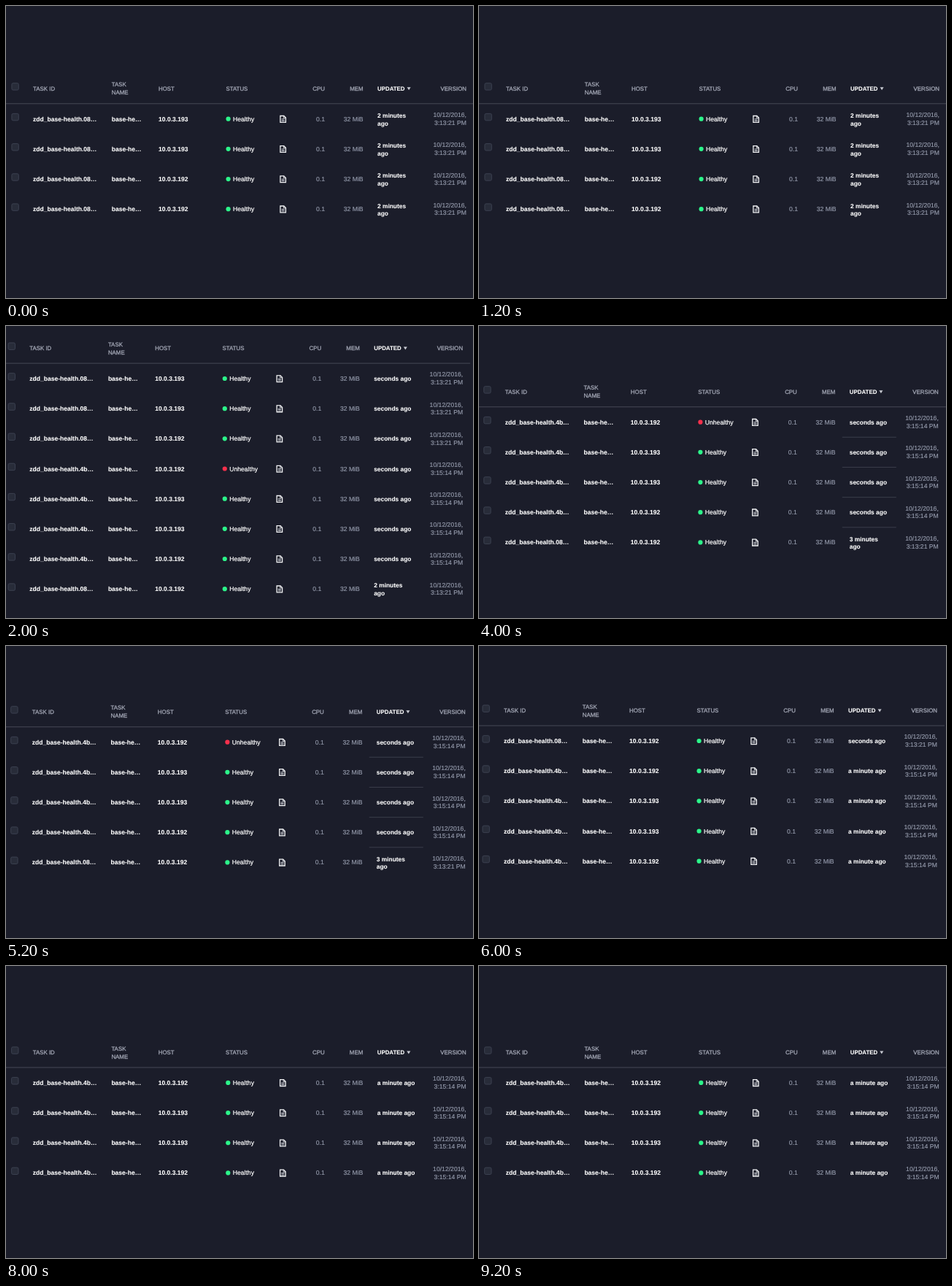
Write an HTML page that moves like this. It is 640 px wide and 400 px high and loops after 10 s.

```html
<!DOCTYPE html>
<html lang="en">
<head>
<meta charset="utf-8">
<title>Task table</title>
<style>
  html, body { margin: 0; width: 100%; height: 100%; overflow: hidden; background: #1b1d2a; }
  svg { display: block; width: 640px; height: 400px; }
  text {
    font: 8.65px "Liberation Sans", Arial, sans-serif;
    fill: #fff;
    stroke: #fff;
    stroke-width: .22px;
    text-rendering: geometricPrecision;
  }
  .head { font-size: 7.9px; fill: #a4a8b6; stroke: #a4a8b6; stroke-width: .28px; }
  .sorted { font-size: 7.9px; font-weight: bold; stroke-width: .1px; }
  .bold { font-weight: bold; font-size: 8.55px; stroke-width: .1px; }
  .updated { font-weight: bold; font-size: 8.4px; stroke-width: .1px; }
  .dim { fill: #949aab; stroke: #949aab; stroke-width: .16px; }
  .right { text-anchor: end; }
  .box { fill: #282c39; stroke: #3f4454; stroke-width: .9px; }
  .rule { stroke: #464956; stroke-width: 1px; }
  .thin { stroke: #3a3d4a; }
  .scene { visibility: hidden; animation: show 10s step-end infinite; }
  @keyframes show {
    0% { visibility: visible; }
    20%, 100% { visibility: hidden; }
  }
</style>
</head>
<body>
<svg id="stage" viewBox="0 0 640 400">
  <defs>
    <g id="doc">
      <path d="M.7 .7H5.6L8.2 3.3V9.5H.7Z" fill="none" stroke="#f2f3f5" stroke-width="1.3"/>
      <path d="M5.3 .7V3.6H8.2" fill="none" stroke="#f2f3f5" stroke-width=".8"/>
      <path d="M2.4 4.9H6.5M2.4 6.3H6.5M2.4 7.7H6.5" stroke="#d5d7dd" stroke-width=".8"/>
    </g>
  </defs>
</svg>
<script>
const stage = document.getElementById('stage');
const PITCH = 41.17;
const VERSIONS = { '08': '3:13:21 PM', '4b': '3:15:14 PM' };

// Each row: task suffix, last digit of host, time since update, optional red status.
const scenes = [
  { x: 0, y: 113, rows: [
    ['08', 3, '2 minutes'], ['08', 3, '2 minutes'],
    ['08', 2, '2 minutes'], ['08', 2, '2 minutes']] },
  { x: -4.8, y: 30.3, rows: [
    ['08', 3, 'seconds'], ['08', 3, 'seconds'], ['08', 2, 'seconds'],
    ['4b', 2, 'seconds', true], ['4b', 3, 'seconds'], ['4b', 3, 'seconds'],
    ['4b', 2, 'seconds'], ['08', 2, '2 minutes']] },
  { x: -1.2, y: 90, ruled: true, rows: [
    ['4b', 2, 'seconds', true], ['4b', 3, 'seconds'], ['4b', 3, 'seconds'],
    ['4b', 2, 'seconds'], ['08', 2, '3 minutes']] },
  { x: -3, y: 88.3, rows: [
    ['08', 2, 'seconds'], ['4b', 2, 'a minute'], ['4b', 3, 'a minute'],
    ['4b', 3, 'a minute'], ['4b', 2, 'a minute']] },
  { x: -.3, y: 118.2, rows: [
    ['4b', 2, 'a minute'], ['4b', 3, 'a minute'],
    ['4b', 3, 'a minute'], ['4b', 2, 'a minute']] }
];

const text = (x, y, cls, str) => `<text x="${x}" y="${y}" class="${cls}">${str}</text>`;
const rule = (x1, x2, y, cls = '') => `<path class="rule ${cls}" d="M${x1} ${y}H${x2}"/>`;
const checkbox = y => `<rect class="box" x="7.9" y="${y - 7.3}" width="9.4" height="9.4" rx="1.8"/>`;

function header() {
  return checkbox(0) +
    text(37, 2.8, 'head', 'TASK ID') +
    text(144.7, -2.7, 'head', 'TASK') +
    text(144.7, 8.4, 'head', 'NAME') +
    text(209, 2.8, 'head', 'HOST') +
    text(301.4, 2.8, 'head', 'STATUS') +
    text(437, 2.8, 'head right', 'CPU') +
    text(489.6, 2.8, 'head right', 'MEM') +
    text(509, 2.8, 'sorted', 'UPDATED') +
    '<path d="M549.6 -1.8H554.6L552.1 2.3Z" fill="#c9cbd3"/>' +
    text(631, 2.8, 'head right', 'VERSION') +
    rule(-10, 641, 20.8);
}

function row([id, host, since, failing], y) {
  const wraps = since.endsWith('minutes');
  const updated = wraps
    ? text(509, y - 1.7, 'updated', since) + text(509, y + 8.8, 'updated', 'ago')
    : text(509, y + 3, 'updated', since + ' ago');
  return checkbox(y) +
    text(37, y + 3, 'bold', `zdd_base-health.${id}…`) +
    text(144.7, y + 3, 'bold', 'base-he…') +
    text(209, y + 3, 'bold', `10.0.3.19${host}`) +
    `<circle cx="304.6" cy="${y}" r="3.1" fill="${failing ? '#f8304c' : '#2cf58a'}"/>` +
    text(311, y + 3, '', failing ? 'Unhealthy' : 'Healthy') +
    `<use href="#doc" x="375.2" y="${y - 4.9}"/>` +
    text(437, y + 3, 'dim right', '0.1') +
    text(489.6, y + 3, 'dim right', '32 MiB') +
    updated +
    text(631, y - 2.5, 'dim right', '10/12/2016,') +
    text(631, y + 8.2, 'dim right', VERSIONS[id]);
}

function table({ x, y, rows, ruled }, i) {
  const body = rows.map((r, n) => {
    const rowY = 41.7 + n * PITCH;
    const line = ruled && n < rows.length - 1 ? rule(499, 573, rowY + 20.6, 'thin') : '';
    return row(r, rowY) + line;
  }).join('');
  return `<g class="scene" style="animation-delay:${i * 2 - 10}s">
    <g transform="translate(${x} ${y})">${header()}${body}</g></g>`;
}

stage.insertAdjacentHTML('beforeend', scenes.map(table).join(''));
</script>
</body>
</html>
```
